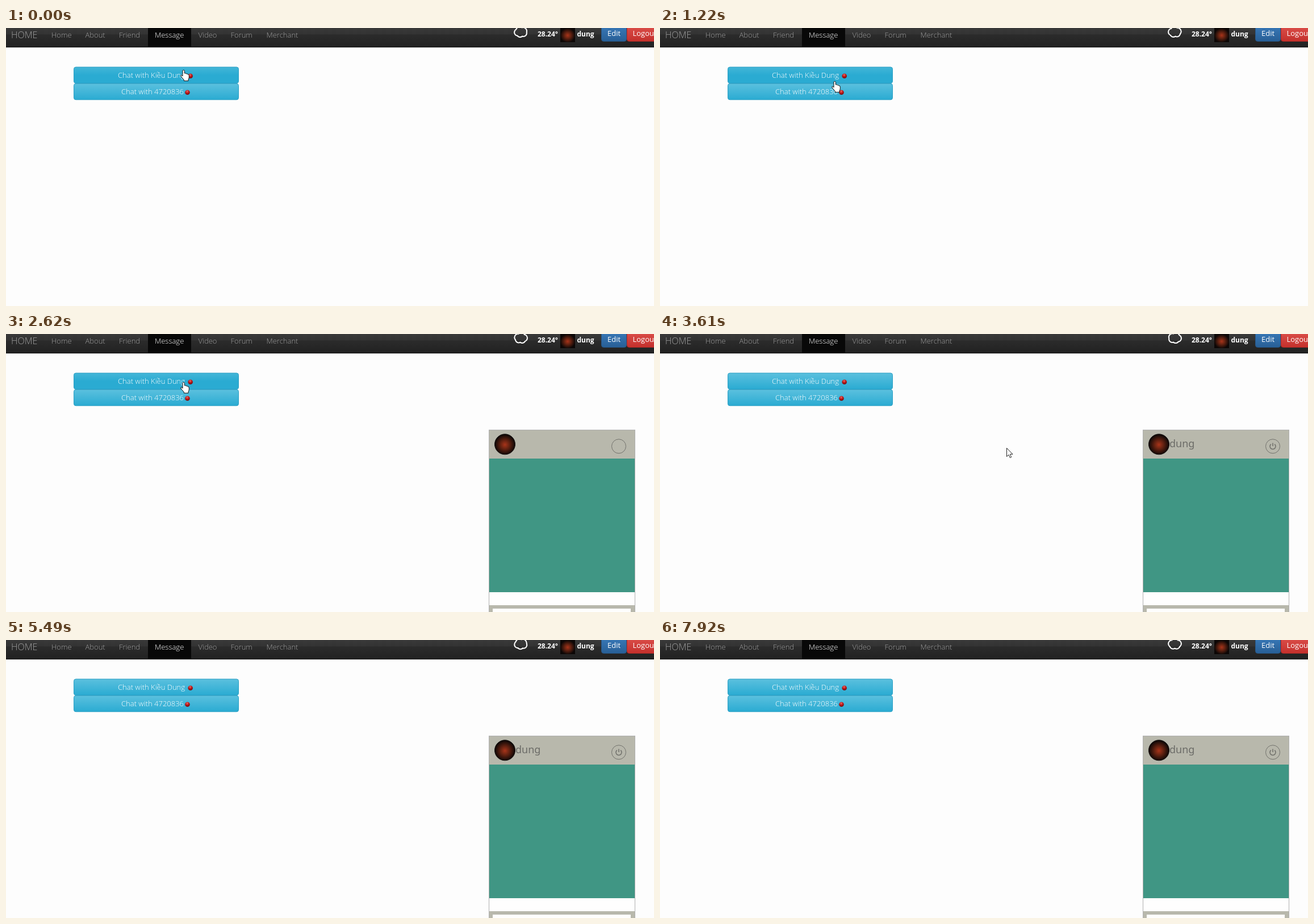
Animation of 1141 by 491 pixels, one loop 7990 ms. Source, as an HTML page with a canvas:

```html
<!DOCTYPE html>
<html lang="en">
<head>
<meta charset="utf-8">
<title>Messages</title>
<style>
html, body { margin: 0; width: 100%; height: 100%; overflow: hidden; background: #fdfdfd; }
svg, canvas { position: absolute; left: 0; top: 0; }
#sky { left: 886px; }
text { font: 300 13px "Open Sans", "Noto Sans", sans-serif; fill: #fff; white-space: pre; }
.nav text { fill: #a0a0a0; }
.nav .on { fill: #fff; }
.nav .brand { font-size: 16px; }
.strong { font-weight: 700; font-size: 12px; }
.action { font-weight: 400; }
.name { font: 300 18px "Noto Sans", "Open Sans", sans-serif; font-stretch: 62.5%; fill: #6c6c68; }
.chat rect { stroke: #2a9fc4; }
</style>
</head>
<body>
<svg width="1141" height="491" viewBox="0 0 1141 491">
  <defs>
    <linearGradient id="bar" x2="0" y2="1">
      <stop stop-color="#393939"/><stop offset=".33" stop-color="#333"/>
      <stop offset=".36" stop-color="#2b2b2b"/><stop offset="1" stop-color="#222"/>
    </linearGradient>
    <linearGradient id="idle" x2="0" y2="1">
      <stop stop-color="#5bc0de"/><stop offset="1" stop-color="#2aabd2"/>
    </linearGradient>
    <linearGradient id="hover" x2="0" y2="1">
      <stop stop-color="#43b6d8"/><stop offset=".5" stop-color="#2aabd2"/>
    </linearGradient>
    <linearGradient id="down" x2="0" y2="1">
      <stop stop-color="#2391b2"/><stop offset=".25" stop-color="#2aabd2"/>
    </linearGradient>
    <linearGradient id="blue" x2="0" y2="1">
      <stop stop-color="#3a7bbb"/><stop offset="1" stop-color="#285f96"/>
    </linearGradient>
    <linearGradient id="red" x2="0" y2="1">
      <stop stop-color="#de524d"/><stop offset="1" stop-color="#c4302c"/>
    </linearGradient>
    <radialGradient id="photo" cx=".5" cy=".52" r=".5">
      <stop stop-color="#a8341a"/><stop offset=".4" stop-color="#6a2412"/>
      <stop offset="1" stop-color="#0c0706"/>
    </radialGradient>
    <radialGradient id="led" cx=".45" cy=".3" r=".7">
      <stop stop-color="#e8706a"/><stop offset=".45" stop-color="#c41a1a"/>
      <stop offset="1" stop-color="#6e0c10"/>
    </radialGradient>
  </defs>

  <rect width="1141" height="33" fill="url(#bar)"/>
  <rect y="33" width="1141" height="1.3" fill="#0c0c0c"/>
  <rect x="250" width="76" height="33" fill="#080808"/>
  <g class="nav">
    <text class="brand" x="9" y="18">HOME</text>
    <text x="80" y="17">Home</text>
    <text x="139.500" y="17">About</text>
    <text x="199" y="17">Friend</text>
    <text class="on" x="262" y="17">Message</text>
    <text x="338.500" y="17">Video</text>
    <text x="395.500" y="17">Forum</text>
    <text x="458.500" y="17">Merchant</text>
  </g>
  <text class="strong" x="936" y="15">28.24°</text>
  <rect x="976" width="26" height="25" fill="url(#photo)"/>
  <text class="strong" x="1005.500" y="15">dung</text>
  <rect x="1048.500" y="-6.500" width="44" height="30" rx="4" fill="url(#blue)" stroke="#26588a"/>
  <rect x="1093.500" y="-6.500" width="66" height="30" rx="4" fill="url(#red)" stroke="#b42b27"/>
  <text class="action" x="1059" y="14">Edit</text>
  <text class="action" x="1103.500" y="14">Logout</text>

  <g class="chat">
    <rect id="first" x="119.500" y="69" width="290" height="28.500" rx="3.500"/>
    <rect id="second" x="119.500" y="98.200" width="290" height="28.500" rx="3.500"/>
    <text x="197" y="87.500">Chat with Kiều Dung</text>
    <text x="203" y="116.500">Chat with 4720836</text>
    <circle cx="324.700" cy="84.700" r="4.300" fill="url(#led)"/>
    <circle cx="319.500" cy="113.700" r="4.300" fill="url(#led)"/>
  </g>

  <g id="panel">
    <rect x="850.500" y="169.500" width="257" height="340" fill="#fefefe" stroke="#b0b0b0"/>
    <rect x="851" y="170" width="256" height="50" fill="#b8b8ac"/>
    <rect x="851" y="220" width="256" height="236" fill="#409684"/>
    <rect x="851" y="479" width="256" height="12" fill="#b8b8ac"/>
    <rect x="857" y="485" width="243" height="6" fill="#fefefe"/>
    <circle cx="878.500" cy="194.800" r="18" fill="url(#photo)" stroke="#14100e"/>
    <circle cx="1079" cy="198.300" r="12.500" fill="none" stroke="#72726c"/>
    <g id="late">
      <text class="name" x="897" y="200">dung</text>
      <path d="M1075.800 194.600A5 5 0 1 0 1082.200 194.600M1079 192.500V198" fill="none" stroke="#72726c" stroke-width="1.600"/>
    </g>
  </g>
</svg>
<canvas id="sky" width="42" height="32"></canvas>
<svg width="1141" height="491">
  <g id="pointer" stroke-linejoin="round">
    <path id="hand" fill="#fff" stroke="#111" d="M-2 1.700Q-2 .3-.4 .3Q1.300 .3 1.300 1.700V6Q4 5.300 4.500 7Q6.700 6.300 7.200 8Q9.300 7.600 9.300 10V13Q9.300 15 8 17V19.300H.3V17.500L-4.500 12Q-6 9.500-4.500 9Q-3.500 8.700-2 11Z"/>
    <path id="arrow" fill="#fff" stroke="#222" d="M.5 .5V15.500L4 12.300L6.300 17.500L8.700 16.500L6.400 11.300H11Z"/>
  </g>
</svg>
<script>
const LOOP = 7990, TAU = Math.PI * 2;
const $ = id => document.getElementById(id);
const show = (el, on) => el.setAttribute('visibility', on ? 'inherit' : 'hidden');
const ctx = $('sky').getContext('2d');

// pointer path: time, x, y
const path = [
  [0, 313, 74], [120, 313, 74], [560, 311, 117], [900, 309, 118],
  [1220, 308, 94], [1580, 313, 85], [3330, 313, 85], [3620, 620, 205],
  [3900, 1003, 400], [4080, 951, 452], [4490, 928, 474], [4760, 924, 494]
];

function pointerAt(t) {
  const i = path.findIndex(p => p[0] > t);
  if (i < 0) return path[path.length - 1].slice(1);
  const [t0, x0, y0] = path[i - 1], [t1, x1, y1] = path[i];
  const k = (t - t0) / (t1 - t0);
  return [x0 + (x1 - x0) * k, y0 + (y1 - y0) * k];
}

// five circles orbiting on an ellipse
function puffs(turn, w, inset) {
  const rmin = w * .24 - inset, grow = w * .04;
  for (let i = 0; i < 5; i++) {
    const a = (turn + i / 5) * TAU, c = Math.cos(a);
    ctx.beginPath();
    ctx.arc(20.5 - Math.sin(a) * w * .21, 7 + c * w * .12 + grow / 2,
      rmin + (1 - c / 2) * grow, 0, TAU);
    ctx.fill();
  }
}

function drawCloud(t) {
  const turn = t / 30000 + .0367, w = 25.5;
  ctx.clearRect(0, 0, 42, 32);
  ctx.fillStyle = '#fff';
  puffs(turn, w, 0);
  ctx.globalCompositeOperation = 'destination-out';
  puffs(turn, w, w * .08);
  ctx.globalCompositeOperation = 'source-over';
}

function frame(now) {
  const t = now % LOOP;
  const [x, y] = pointerAt(t);
  const inside = (top, end) => x >= 119 && x <= 410 && y >= top && y < end;
  const one = inside(69, 98), two = inside(98, 127);
  const pressed = one && t >= 2300 && t < 2430;
  $('first').setAttribute('fill', `url(#${pressed ? 'down' : one ? 'hover' : 'idle'})`);
  $('second').setAttribute('fill', `url(#${two ? 'hover' : 'idle'})`);
  show($('panel'), t >= 2510);
  show($('late'), t >= 2850);
  $('pointer').setAttribute('transform', `translate(${Math.round(x)} ${Math.round(y)})`);
  show($('hand'), one || two);
  show($('arrow'), !one && !two);
  drawCloud(t);
  requestAnimationFrame(frame);
}
requestAnimationFrame(frame);
</script>
</body>
</html>
```
